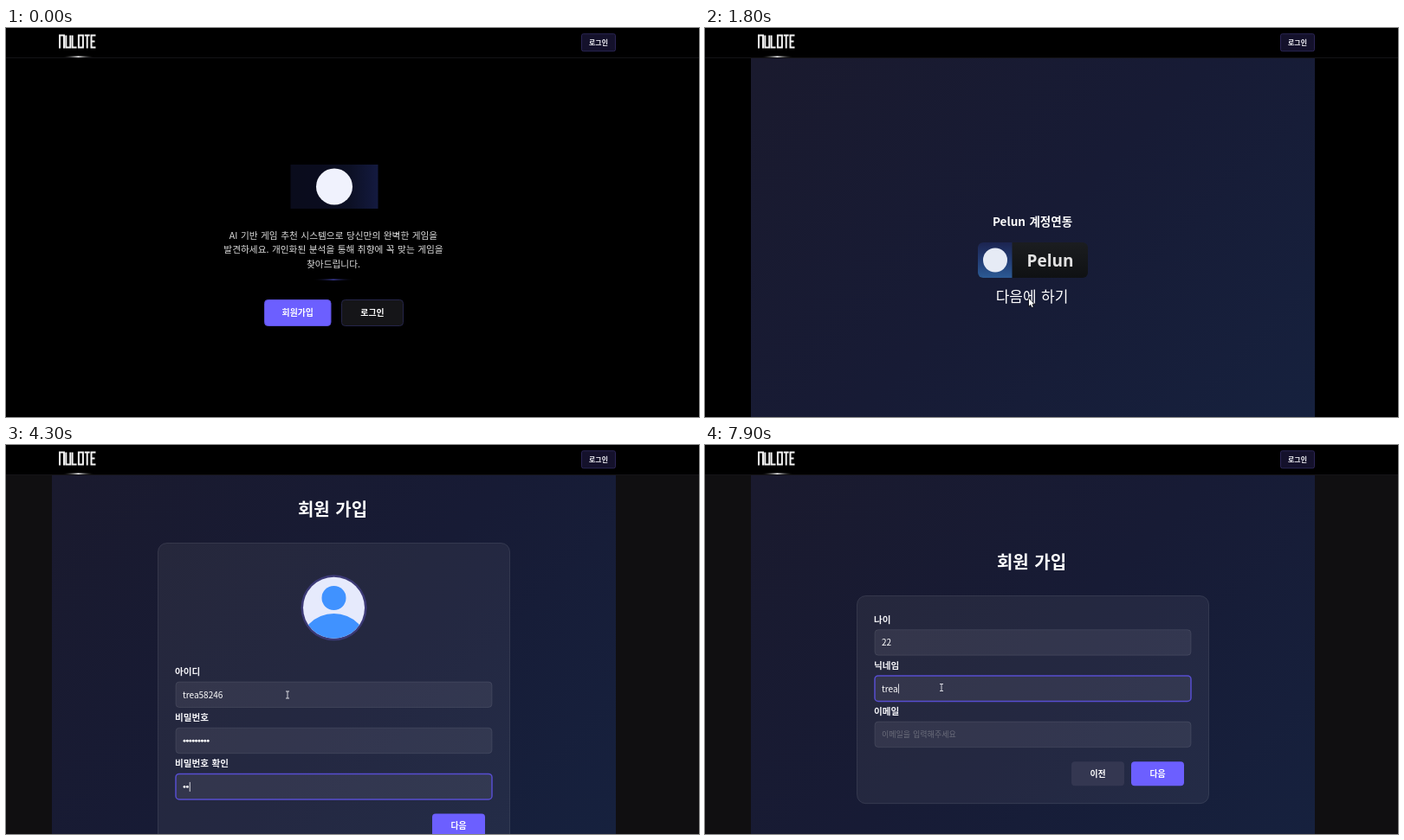
An HTML page with a canvas for the animation above (8000 ms loop, 800 by 450 pixels).

```html
<!DOCTYPE html>
<html lang="ko">
<head>
<meta charset="utf-8">
<title>Sign up</title>
<style>
html, body { margin: 0; width: 100%; height: 100%; overflow: hidden; background: #000; }
canvas { display: block; width: 800px; height: 450px; }
</style>
</head>
<body>
<canvas id="stage" aria-label="Sign up walkthrough"></canvas>
<script>
const LOOP = 8000, STEP = 100;
const KR = '"Noto Sans CJK KR", "Noto Sans CJK", sans-serif';
const UI = '"Open Sans", "Noto Sans", sans-serif';
const VIOLET = '#6c5fff';
const USER = 'trea58246';
const SAVED = ['rgk7302', 'trea5721', 'trea604', 'aceritol839'];

const canvas = document.getElementById('stage');
const ctx = canvas.getContext('2d');
const dpr = window.devicePixelRatio || 1;
canvas.width = 800 * dpr;
canvas.height = 450 * dpr;

const clamp = (v, a, b) => Math.min(b, Math.max(a, v));
// Number of keys pressed since start
const typed = (t, start, gap, max) => clamp(Math.floor((t - start) / gap) + 1, 0, max);

function box(x, y, w, h, r, fill, stroke, line = 1) {
  ctx.beginPath();
  ctx.roundRect(x, y, w, h, r);
  if (fill) { ctx.fillStyle = fill; ctx.fill(); }
  if (stroke) { ctx.strokeStyle = stroke; ctx.lineWidth = line; ctx.stroke(); }
}

function disc(x, y, r, fill) {
  ctx.beginPath();
  ctx.arc(x, y, r, 0, Math.PI * 2);
  ctx.fillStyle = fill;
  ctx.fill();
}

function text(str, x, y, size, color = '#fff', align = 'left', weight = 500, family = KR) {
  ctx.font = `${weight} ${size}px ${family}`;
  ctx.wordSpacing = family === KR ? `${size * 0.1}px` : '0px';
  ctx.textAlign = align;
  ctx.textBaseline = 'alphabetic';
  ctx.fillStyle = color;
  ctx.fillText(str, x, y + size * 0.36);
}

function gradient(x0, y0, x1, y1, ...colors) {
  const g = ctx.createLinearGradient(x0, y0, x1, y1);
  colors.forEach((c, i) => g.addColorStop(i / (colors.length - 1), c));
  return g;
}

function button(label, x, y, w, h, fill, stroke) {
  box(x, y, w, h, 4, fill, stroke);
  text(label, x + w / 2, y + h / 2, 9.9, '#fff', 'center', 700);
}

const WORDMARK = [
  'M0 15V0H5V15', 'M0 0V14H5V0', 'M0 0V14H5',
  'M0 0H5V14H0Z', 'M-.5 0H5.5M2.5 0V15', 'M5 0H0V14H5M0 7H4'
].map(d => new Path2D(d));

function header() {
  ctx.fillStyle = '#000';
  ctx.fillRect(0, 0, 800, 35);
  ctx.fillStyle = '#141317';
  ctx.fillRect(0, 34, 800, 1);
  ctx.strokeStyle = '#f4f4f4';
  ctx.lineWidth = 2;
  WORDMARK.forEach((glyph, i) => {
    ctx.save();
    ctx.translate(62 + i * 7.3, 8.5);
    ctx.stroke(glyph);
    ctx.restore();
  });
  ctx.fillStyle = gradient(65, 0, 102, 0, 'transparent', '#fff', 'transparent');
  ctx.fillRect(65, 32.5, 37, 1.5);
  box(664.5, 6.8, 39, 20, 2, '#14112b', '#2b2555');
  text('로그인', 684, 17, 7.9, '#f4f4f8', 'center', 700);
}

function panel() {
  ctx.fillStyle = gradient(112, -23, 645, 508, '#1a1a2e', '#171b35', '#16213e');
  ctx.fillRect(53, 35, 651, 415);
}

function landing() {
  ctx.fillStyle = gradient(329, 0, 430, 0, '#0a0c1c', '#0a0c1e', '#0c1024', '#141a40');
  ctx.fillRect(328.5, 158, 101, 51);
  disc(379, 183.5, 21, '#f0f2fd');
  ['AI 기반 게임 추천 시스템으로 당신만의 완벽한 게임을',
   '발견하세요. 개인화된 분석을 통해 취향에 꼭 맞는 게임을',
   '찾아드립니다.'
  ].forEach((s, i) => text(s, 378, 240 + i * 16.6, 10.7, '#dcdcdc', 'center'));
  ctx.fillStyle = gradient(354, 0, 402, 0, 'transparent', '#4a4ac0', 'transparent');
  ctx.fillRect(354, 290.5, 48, 1.2);
  button('회원가입', 298.5, 314.5, 76.5, 30, VIOLET, '#5c51dc');
  button('로그인', 387.5, 314.5, 71, 30, '#151518', '#25254a');
}

function linkAccount() {
  panel();
  text('Pelun 계정연동', 378, 224, 13.5, '#fff', 'center', 700);
  ctx.save();
  box(315, 248, 127, 41, 6, gradient(0, 248, 0, 289, '#1b1d20', '#0f1113'));
  ctx.clip();
  ctx.fillStyle = gradient(0, 248, 0, 289, '#1c2450', '#223c74', '#2c5a94');
  ctx.fillRect(315, 248, 39.5, 41);
  ctx.restore();
  disc(335, 268.5, 14, '#e6ebf5');
  text('Pelun', 398.5, 269.5, 19, '#e2e2e2', 'center', 700, UI);
  text('다음에 하기', 377.5, 311, 17, '#fff', 'center');
}

function avatar() {
  const x = 378.5, y = 188.3;
  disc(x, y, 38, '#3b3975');
  disc(x, y, 35.5, '#e6eafc');
  ctx.save();
  ctx.beginPath();
  ctx.arc(x, y, 35.5, 0, Math.PI * 2);
  ctx.clip();
  disc(x, 177, 14, '#4092ff');
  disc(x, 235, 40, '#4092ff');
  ctx.restore();
}

function caret(x, y, idle) {
  if (idle % 1000 >= 500) return;
  ctx.fillStyle = '#fff';
  ctx.fillRect(x, y - 5.5, 0.8, 11);
}

function field(f, labelY) {
  const top = labelY + 12, mid = top + 15;
  text(f.label, 195, labelY, 10.6, '#f4f4f8', 'left', 700);
  box(196, top, 365, 29.5, 4, 'rgba(255,255,255,.065)',
    f.focus ? '#574dd0' : 'rgba(255,255,255,.085)', f.focus ? 1.5 : 1);
  let end = 204.6;
  if (f.dots) {
    for (let i = 0; i < f.dots; i++) disc(206 + i * 3.4, mid, 1.45, '#fff');
    end += f.dots * 3.4 + 0.4;
  } else if (f.value) {
    text(f.value, 204, mid, 10);
    end += ctx.measureText(f.value).width;
  } else {
    text(f.hint + ' 입력해주세요', 204, mid, 9, '#6b6d7b');
  }
  if (f.focus) caret(end, mid, f.idle);
}

function form(top, firstLabel, fields, hasBack) {
  ctx.fillStyle = '#100f11';
  ctx.fillRect(0, 35, 800, 415);
  panel();
  text('회원 가입', 377, top - 38, 20, '#fff', 'center', 700);
  const buttonY = firstLabel + 164.5;
  box(175.5, top + 0.5, 406, buttonY + 48 - top, 10,
    'rgba(255,255,255,.055)', 'rgba(255,255,255,.1)');
  fields.forEach((f, i) => field(f, firstLabel + i * 53.2));
  if (hasBack) button('이전', 423, buttonY, 61, 28, '#343751');
  button('다음', 492, buttonY, 61, 28, VIOLET);
}

function suggestions(t, value) {
  if (t < 2100 || t >= 3100) return;
  const items = SAVED.filter(s => s.startsWith(value.slice(0, 5)));
  ctx.save();
  ctx.globalAlpha = t < 2900 ? 1 : t < 3000 ? 0.72 : 0.25;
  ctx.beginPath();
  ctx.moveTo(252, 308.5);
  ctx.lineTo(256.5, 304);
  ctx.lineTo(261, 308.5);
  ctx.fillStyle = '#16171b';
  ctx.fill();
  box(246, 308, 79, 5 + items.length * 18.3, 3, '#16171b');
  items.forEach((s, i) => text(s, 252, 320 + i * 18.4, 6.4, '#f0f0f0', 'left', 400, UI));
  ctx.restore();
}

function account(t) {
  const value = USER.slice(0, typed(t, 2400, 100, 9));
  form(113, 262, [
    { label: '아이디', hint: '아이디를', value, focus: t >= 2000 && t < 3300, idle: 0 },
    { label: '비밀번호', hint: '비밀번호를', dots: typed(t, 3400, 80, 9),
      focus: t >= 3300 && t < 4100, idle: 0 },
    { label: '비밀번호 확인', hint: '비밀번호를 다시', dots: typed(t, 4200, 100, 9),
      focus: t >= 4100, idle: Math.max(0, t - 5000) }
  ]);
  avatar();
  suggestions(t, value);
}

function profile(t) {
  form(174, 201.7, [
    { label: '나이', hint: '나이를', value: '22'.slice(0, typed(t, 6400, 200, 2)),
      focus: t >= 5800 && t < 7100, idle: t < 6400 ? 0 : Math.max(0, t - 6600) },
    { label: '닉네임', hint: '닉네임을', value: USER.slice(0, typed(t, 7500, 100, 4)),
      focus: t >= 7100, idle: 0 },
    { label: '이메일', hint: '이메일을' }
  ], true);
}

// Pointer stops: time, x, y
const STOPS = [
  [300, 440, 350], [800, 334, 340], [1000, 333, 338], [1400, 333, 338],
  [1700, 374, 313], [1800, 374, 313], [2000, 325, 289], [5000, 325, 289],
  [5300, 520, 440], [5500, 520, 440], [5700, 293, 228], [6700, 293, 228],
  [7000, 273, 280.5]
];

function pointerAt(t) {
  const i = STOPS.findIndex(s => s[0] > t);
  if (i < 0) return STOPS[STOPS.length - 1].slice(1);
  const [t0, x0, y0] = STOPS[i - 1], [t1, x1, y1] = STOPS[i];
  const p = (t - t0) / (t1 - t0), e = p * p * (3 - 2 * p);
  return [x0 + (x1 - x0) * e, y0 + (y1 - y0) * e];
}

const ARROW = new Path2D('M0 0V8.6L2 6.8L3.4 10L4.8 9.4L3.4 6.3H6Z');
const IBEAM = new Path2D('M-2-4H2M0-4V4M-2 4H2');

function pointer(t) {
  if (t < STOPS[0][0]) return;
  const [x, y] = pointerAt(t);
  ctx.save();
  ctx.translate(x, y);
  if ((t >= 2000 && t < 5100) || t >= 5700) {
    ctx.strokeStyle = '#e8e8ee';
    ctx.lineWidth = 0.9;
    ctx.stroke(IBEAM);
  } else {
    ctx.strokeStyle = '#111';
    ctx.lineWidth = 1.2;
    ctx.stroke(ARROW);
    ctx.fillStyle = '#fff';
    ctx.fill(ARROW);
  }
  ctx.restore();
}

function draw(now) {
  const t = Math.floor((now % LOOP) / STEP) * STEP;
  ctx.setTransform(dpr, 0, 0, dpr, 0, 0);
  ctx.fillStyle = '#000';
  ctx.fillRect(0, 0, 800, 450);
  if (t < 1000) landing();
  else if (t < 1900) linkAccount();
  else if (t < 5500) account(t);
  else profile(t);
  header();
  pointer(t);
}

const start = performance.now();
function tick() {
  draw(performance.now() - start);
  requestAnimationFrame(tick);
}
tick();
</script>
</body>
</html>
```
